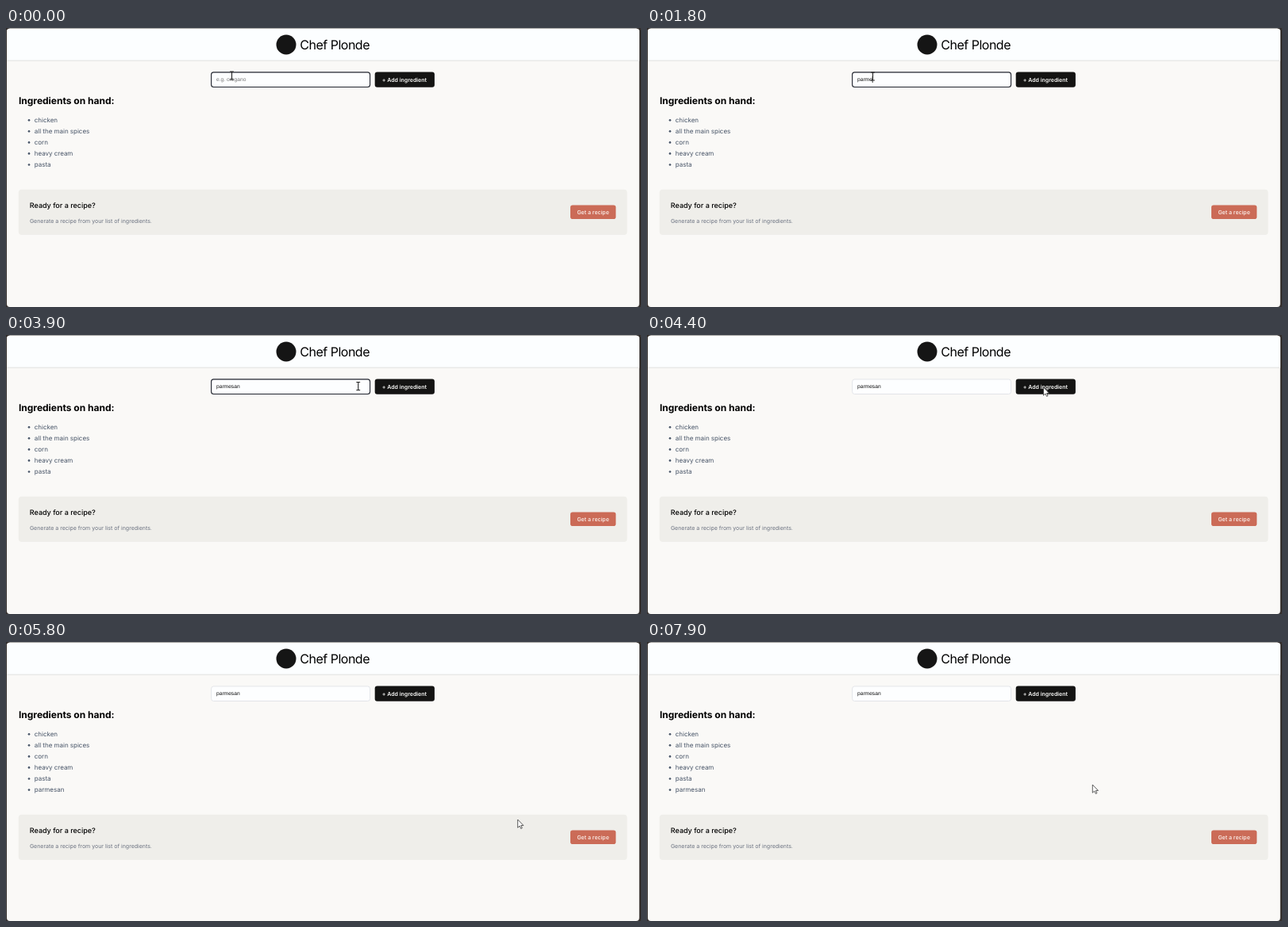
An HTML page for the animation above (8000 ms loop, 800 by 352 pixels).

```html
<!DOCTYPE html>
<html lang="en">
<head>
<meta charset="utf-8">
<title>Recipe helper</title>
<style>
  html, body { margin: 0; width: 100%; height: 100%; overflow: hidden; background: #35302e; }
  svg { display: block; font-family: Inter, sans-serif; text-rendering: geometricPrecision; }
  .title { font-size: 16px; letter-spacing: -.5px; }
  .heading { font-size: 12px; font-weight: 700; }
  .list { font-size: 8px; letter-spacing: -.02px; fill: #475467; }
  .ready { font-size: 9px; font-weight: 500; }
  .small { font-size: 7px; }
  .field { font: 6.667px "Liberation Sans", Arial, sans-serif; }
</style>
</head>
<body>
<svg width="800" height="352" viewBox="0 0 800 352">
  <defs><clipPath id="page"><rect x="1" y=".8" width="796.8" height="351.2" rx="4"/></clipPath></defs>
  <g clip-path="url(#page)">
    <rect width="800" height="352" fill="#faf9f7"/>
    <rect width="800" height="42" fill="#e9e9e8"/>
    <rect width="800" height="40.5" fill="#fcfeff"/>
  </g>
  <circle cx="353" cy="21" r="12.5" fill="#151515"/>
  <text class="title" x="370.3" y="26.6">Chef Plonde</text>

  <rect id="box" x="258.6" y="55.9" width="200" height="18.6" rx="3" fill="#fdfeff"/>
  <text id="entry" class="field" x="265" y="67.2"></text>
  <path id="caret" d="M0 61v8" stroke="#000" stroke-width=".8"/>
  <rect x="464.7" y="55.5" width="75.2" height="19.3" rx="3" fill="#141413"/>
  <text class="small" x="473.7" y="67.6" fill="#fafaf8" font-weight="600">+ Add ingredient</text>

  <text class="heading" x="15.9" y="96.2">Ingredients on hand:</text>
  <g id="list" class="list"></g>

  <g id="panel">
    <rect x="15.8" y="203.8" width="766.7" height="57.2" rx="4" fill="#efeeea"/>
    <text class="ready" x="29.8" y="227.1">Ready for a recipe?</text>
    <text class="small" x="29.9" y="246.1" fill="#6b7280">Generate a recipe from your list of ingredients.</text>
    <rect x="711" y="223.6" width="57.3" height="17.4" rx="2.8" fill="#cb6b57"/>
    <text class="small" x="719.4" y="234.6" fill="#fdf5f1" font-weight="500">Get a recipe</text>
  </g>

  <path id="beam" d="M-2.4 -5h4.8M0 -5v10M-2.4 5h4.8" fill="none" stroke="#222" stroke-width="1.1"/>
  <path id="arrow" d="M0 0V10.2L2.4 8L4 11.4L5.6 10.7L4.1 7.4H7.2Z" fill="#fff" stroke="#333" stroke-width=".8" stroke-linejoin="round"/>
</svg>
<script>
const LOOP = 8000, STEP = 100, WORD = 'parmesan';
const ITEMS = ['chicken', 'all the main spices', 'corn', 'heavy cream', 'pasta', WORD];
const KEY_TIMES = [900, 1100, 1300, 1500, 1700, 2400, 2700, 3100];
const PRESS = 4300, RELEASE = 4500;
// Pointer path: time, x, y
const PATH = [
  [0, 284.5, 60], [1200, 284.5, 60], [1300, 284.5, 61], [2200, 284.5, 61], [2300, 284.5, 60],
  [3500, 284.5, 60], [4100, 499.5, 66], [4500, 499.5, 66], [5100, 539.3, 161.3],
  [6200, 690, 251], [6500, 693, 252.5], [6700, 692.8, 248], [7200, 692, 250], [7900, 561.3, 180]
];
const $ = id => document.getElementById(id);
const set = (id, attrs) => { for (const k in attrs) $(id).setAttribute(k, attrs[k]); };
const show = (id, on) => set(id, { visibility: on ? 'visible' : 'hidden' });

$('list').innerHTML = ITEMS.map((name, i) => {
  const y = 119 + i * 14.05;
  return `<g id="item${i}"><circle cx="29" cy="${y - 2.7}" r="1.35"/><text x="35.8" y="${y}">${name}</text></g>`;
}).join('');

function pointer(t) {
  const i = Math.max(1, PATH.findIndex(p => p[0] >= t));
  const [t0, x0, y0] = PATH[i - 1], [t1, x1, y1] = PATH[i];
  const u = (t - t0) / (t1 - t0), e = u * u * (3 - 2 * u);
  return [x0 + (x1 - x0) * e, y0 + (y1 - y0) * e];
}

function draw(t) {
  const typed = KEY_TIMES.filter(k => k <= t).length;
  const focused = t < PRESS, added = t >= RELEASE;
  const lastKey = typed ? KEY_TIMES[typed - 1] : -500;

  $('entry').textContent = WORD.slice(0, typed) || 'e.g. oregano';
  set('entry', { fill: typed ? '#111' : '#757575' });
  set('box', focused ? { stroke: '#20242e', 'stroke-width': 1.1 } : { stroke: '#d9dce1', 'stroke-width': .7 });
  const end = typed ? $('entry').getComputedTextLength() : 0;
  set('caret', { transform: `translate(${265.3 + end} 0)` });
  show('caret', focused && (t - lastKey) % 1000 < 500);

  show('item5', added);
  set('panel', { transform: `translate(0 ${added ? 14 : 0})` });

  const [x, y] = pointer(t), overField = x < 459 && y < 75;
  for (const id of ['beam', 'arrow']) set(id, { transform: `translate(${x} ${y})` });
  show('beam', overField);
  show('arrow', !overField);
}

const start = performance.now();
function tick() {
  const t = (performance.now() - start) % LOOP;
  draw(Math.floor(t / STEP) * STEP);
  requestAnimationFrame(tick);
}
tick();
</script>
</body>
</html>
```
